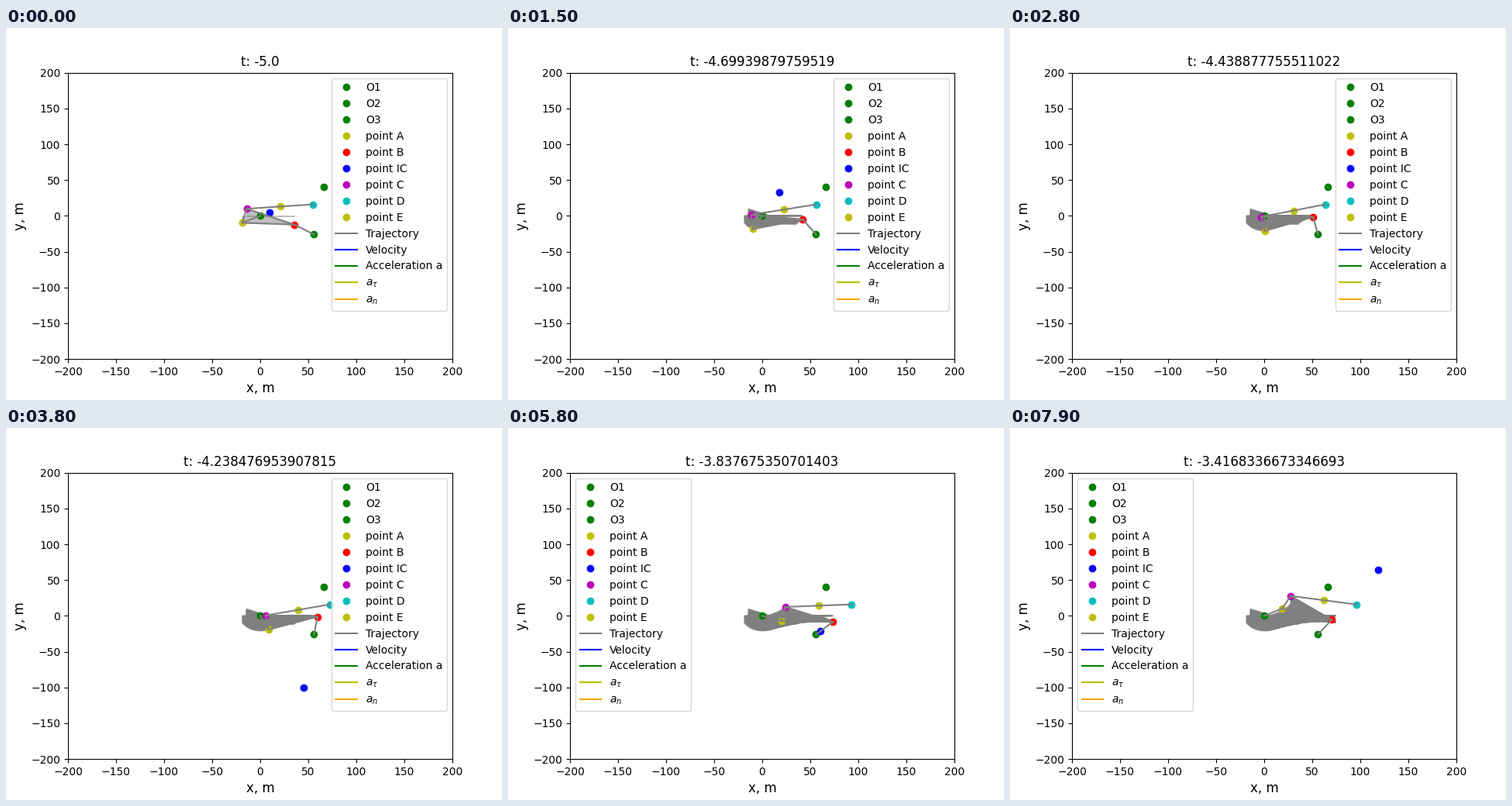
Recreate the animation shown at these times as a matplotlib script. Size 640 by 480 pixels, loop 8 s.

```python
import matplotlib.pyplot as plt
import numpy as np
from matplotlib.animation import FuncAnimation
from matplotlib.collections import PolyCollection

FRAMES, INTERVAL = 80, 100
TIMES = np.linspace(-5, 5, 500)[:FRAMES]

# Four-bar linkage with a slider on the line y = SLIDE_Y
O1, O2, O3 = np.array([[0, 0], [56, -26], [66, 40]], float)
O1A, O2B, AB, AC, BC, CD, CE = 21, 25, 54, 20, 54, 69, 35
SLIDE_Y = 16
OMEGA, PHI0 = 2, np.pi / 3


def polar(r, angle):
    return r * np.array([np.cos(angle), np.sin(angle)])


def corner(a, b, opposite):
    """Angle between sides a and b of a triangle."""
    return np.arccos((a**2 + b**2 - opposite**2) / (2 * a * b))


def pose(t):
    phi = OMEGA * t + PHI0
    a = polar(O1A, phi)
    gap = O2 - a
    theta = np.arctan2(gap[1], gap[0]) + corner(AB, np.hypot(*gap), O2B)
    b = a + polar(AB, theta)
    c = a + polar(AC, theta + corner(AB, AC, BC))
    rise = SLIDE_Y - c[1]
    d = c + np.array([np.sqrt(CD**2 - rise**2), rise])
    e = c + (d - c) * CE / CD
    # instantaneous centre: where lines O1-A and O2-B meet
    k = np.linalg.solve(np.column_stack([a, O2 - b]), O2)[0]
    return {"A": a, "B": b, "IC": k * a, "C": c, "D": d, "E": e,
            "O1": O1, "O2": O2}


def shade(p):
    """Outline of the area between the path A-B-C and the x axis."""
    a, b, c = p["A"], p["B"], p["C"]
    return [(a[0], 0), a, b, c, (c[0], 0), (c[0], 0), (b[0], 0), (a[0], 0)]


POSES = [pose(t) for t in TIMES]
SHADES = [shade(p) for p in POSES]

fig, ax = plt.subplots(figsize=(6.4, 4.8), dpi=100)
ax.set_xlim(-200, 200)
ax.set_ylim(-200, 200)
ax.set_xlabel("x, m", fontsize=12)
ax.set_ylabel("y, m", fontsize=12)
title = ax.set_title("")

trail = PolyCollection([], color="gray", alpha=0.5)
ax.add_collection(trail, autolim=False)

for name, pos in zip(("O1", "O2", "O3"), (O1, O2, O3)):
    ax.plot(*pos, "go", label=name)

dots = {name: ax.plot([], [], color + "o", label=f"point {name}")[0]
        for name, color in zip(("A", "B", "IC", "C", "D", "E"), "yrbmcy")}

LINKS = [("O1", "A"), ("O2", "B"), ("A", "B"), ("B", "C"), ("C", "A"), ("C", "D")]
rods = [ax.plot([], [], color="gray")[0] for _ in LINKS]
rods[0].set_label("Trajectory")

for label, color in (("Velocity", "b"), ("Acceleration a", "g"),
                     (r"$a_{\tau}$", "y"), ("$a_n$", "orange")):
    ax.plot([], [], color=color, label=label)

ax.legend(loc="best")


def update(i):
    p = POSES[i]
    title.set_text(f"t: {TIMES[i]}")
    trail.set_verts(SHADES[:i + 1])
    for name, dot in dots.items():
        dot.set_data(*p[name].reshape(2, 1))
    for rod, (start, end) in zip(rods, LINKS):
        rod.set_data(*np.column_stack([p[start], p[end]]))
    return [title, trail, *dots.values(), *rods]


anim = FuncAnimation(fig, update, frames=FRAMES, interval=INTERVAL,
                     repeat=True, repeat_delay=0, blit=False)
plt.show()
```
